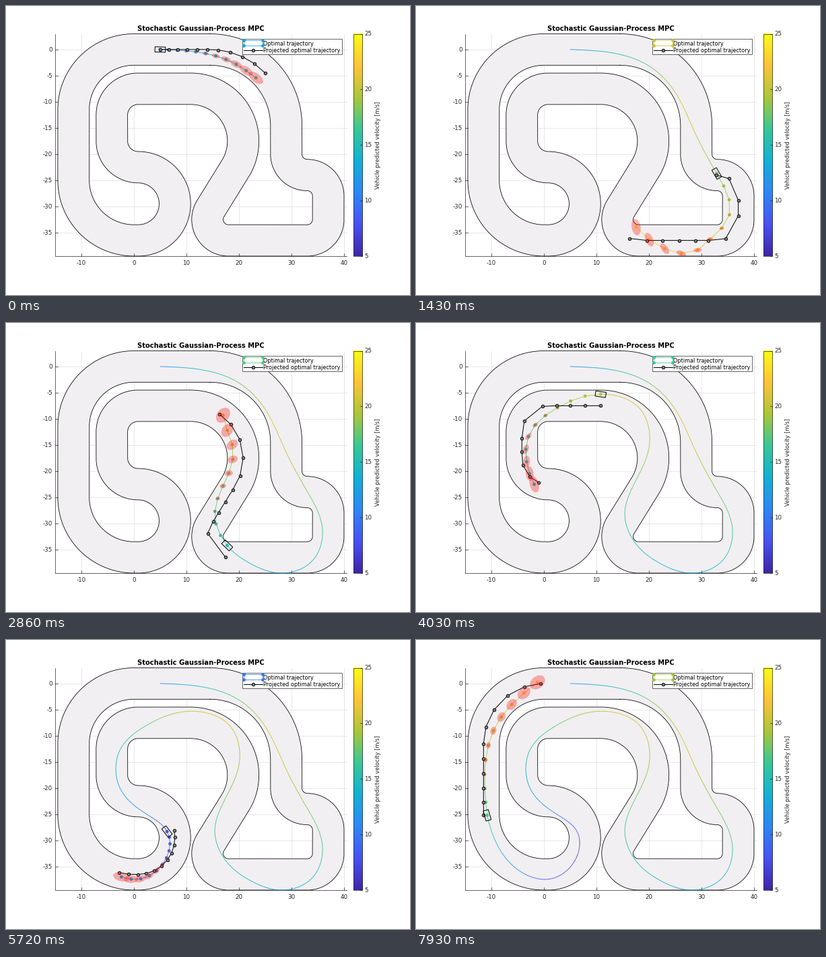
A matplotlib script for the animation above (8 s loop, 600 px wide and 431 px high).

```python
import numpy as np
import matplotlib.pyplot as plt
from matplotlib.animation import FuncAnimation
from matplotlib.collections import LineCollection
from matplotlib.colors import LinearSegmentedColormap, Normalize
from matplotlib.patches import Ellipse, Polygon, Rectangle

W, H, DPI = 600, 431, 72
LOOP, TICK, STEP = 8000, 50, 130      # ms
LAST = 61                             # last simulation step
SUB = 10                              # trail samples per step
SCALE, X0, Y0 = 7.8, 190, 64.9        # pixels per metre, pixel of (0, 0)
INK = "0.15"
plt.rcParams["font.family"] = "DejaVu Sans"

parula = LinearSegmentedColormap.from_list("parula", [
    (.2422, .1504, .6603), (.2810, .3228, .9579), (.1786, .5289, .9682),
    (.0689, .6948, .8394), (.2161, .7843, .5923), (.6720, .7793, .2227),
    (.9970, .7659, .2199), (.9769, .9839, .0805)])
speed_norm = Normalize(5, 25)


def speed_color(v):
    return parula(speed_norm(v))


def to_px(p):
    return np.asarray(p) * (SCALE, -SCALE) + (X0, Y0)


def bump(x, mid, width):
    return np.exp(-((x - mid) / width) ** 2)


def arc_length(p):
    return np.r_[0, np.cumsum(np.hypot(*np.diff(p, axis=0).T))]


def along(p, s, at):
    return np.c_[np.interp(at, s, p[:, 0]), np.interp(at, s, p[:, 1])]


def spline(points, n=2000):
    """Natural cubic through points: the curve and the knots' arc lengths."""
    p = np.asarray(points, float)
    t = arc_length(p)
    h = np.diff(t)
    slope = np.diff(p, axis=0) / h[:, None]
    a, rhs = np.eye(len(p)), np.zeros_like(p)
    for i in range(1, len(p) - 1):
        a[i, i - 1:i + 2] = h[i - 1], 2 * (h[i - 1] + h[i]), h[i]
        rhs[i] = 6 * (slope[i] - slope[i - 1])
    m = np.linalg.solve(a, rhs)
    u = np.linspace(0, t[-1], n)
    i = np.clip(np.searchsorted(t, u) - 1, 0, len(h) - 1)
    w = ((u - t[i]) / h[i])[:, None]
    q = 1 - w
    curve = (q * p[i] + w * p[i + 1]
             + ((q**3 - q) * m[i] + (w**3 - w) * m[i + 1]) * h[i, None]**2 / 6)
    return curve, np.interp(t, u, arc_length(curve))


# ---- track: arcs (cx, cy, radius, from, to) joined by straights ----
ARCS = [
    (14.5, -14.5, 14.5, 90, 0), (33, -20, 4, 180, 270), (33, -28, 4, 90, 0),
    (33, -32.5, 4, 0, -90), (18, -32.5, 4, -90, -211.7),
    (10.8, -17.5, 10, -31.7, 90), (.8, -12.5, 5, 90, 180),
    (.8, -17.5, 5, 180, 270), (.8, -29.5, 7, 90, -90),
    (0, -25, 11.5, 270, 180), (0, -11.5, 11.5, 180, 90)]


def track_line(offset):
    """Closed line parallel to the track centre, positive to the left."""
    parts = []
    for cx, cy, r, a, b in ARCS:
        t = np.radians(np.linspace(a, b, 60))
        rad = r + offset * (1 if b < a else -1)
        parts.append(np.c_[cx + rad * np.cos(t), cy + rad * np.sin(t)])
    parts.append(parts[0][:1])
    return np.vstack(parts)


# ---- driven route through a few points (metres) ----
ROUTE = [
    (5, 0), (14.1, -.85), (20.1, -3.2), (25, -8.2), (28.8, -16),
    (32.9, -23.7), (35.9, -31.2), (34, -37.1), (28.2, -39.5), (22.4, -37.8),
    (17.75, -34.2), (15.4, -28.2), (17.3, -22.2), (20.1, -14.8), (18.2, -8),
    (10.8, -5.3), (2.4, -8), (-2.8, -13), (-2.6, -20.1), (2.6, -25.1),
    (6.3, -28.3), (6.7, -31.7), (1.5, -37.3), (-5.1, -35.5), (-10.8, -25.2),
    (-11.5, -18), (-9.5, -8.6), (1, 1.9)]
PASS_STEPS = [0, 11, 22, 31, 44, 53, 61]      # when these points are passed
PASS_POINTS = [0, 5, 10, 15, 20, 22, 24]
SPEED_STEPS = [0, 7.5, 12, 18, 30, 36, 45, 54, 61]
SPEEDS = [10.5, 21, 17.5, 12.3, 21, 14.5, 7, 7.5, 17]

route, knot_s = spline(ROUTE)
route_s = arc_length(route)
fine = np.arange(LAST * SUB + 1) / SUB
speed = np.interp(fine, SPEED_STEPS, SPEEDS)
ran = np.cumsum(speed) - speed[0]
trail_s = np.interp(ran, ran[np.array(PASS_STEPS) * SUB], knot_s[PASS_POINTS])
trail = along(route, route_s, trail_s)
trail_px = to_px(trail)
trail_segs = np.stack([trail_px[:-1], trail_px[1:]], axis=1)
trail_cols = speed_color(speed[:-1])

# ---- planned line: the route, swerving aside (place, metres left, width) ----
SWERVES = [(24, 1.2, 4), (55, -2.3, 5.5), (98, 2.3, 6), (139, -1.5, 4.5),
           (173, .9, 5)]
HORIZON, PLAN_DT = 10, .15
tangent = np.gradient(route, route_s, axis=0)
aside = sum(a * bump(route_s, s, w) for s, a, w in SWERVES)
plan = route + np.c_[-tangent[:, 1], tangent[:, 0]] * aside[:, None]
plan_s = arc_length(plan)

centre = track_line(0)
centre_s = arc_length(centre)
dense_s = np.linspace(0, centre_s[-1], 3000)
dense = along(centre, centre_s, dense_s)


def predict(k):
    """Predicted points and speeds: speeding up, but braking near step 32."""
    n = k * SUB
    gain = 5.5 - 11.5 * bump(k, 32, 5)
    v = speed[n] + np.linspace(0, gain, HORIZON + 1)
    start = np.interp(trail_s[n], route_s, plan_s)
    gone = np.r_[0, np.cumsum(v[:-1])] * PLAN_DT
    pts = along(plan, plan_s, start + gone)
    fade = .7 ** np.arange(HORIZON + 1)[:, None]
    return pts + (trail[n] - pts[0]) * fade, v


def project(points):
    """Nearest centre-line points, leading a little far ahead."""
    gap = np.hypot(points[:, None, 0] - dense[:, 0],
                   points[:, None, 1] - dense[:, 1])
    s = dense_s[gap.argmin(axis=1)] + .06 * np.arange(len(points))
    return along(centre, centre_s, s % centre_s[-1])


# ---- fixed parts ----
fig = plt.figure(figsize=(W / DPI, H / DPI), dpi=DPI, facecolor="white")
ax = fig.add_axes([0, 0, 1, 1])
ax.axis("off")
LEFT, RIGHT, TOP, BOTTOM = 72.5, 506, 41.5, 372.8
BAR_L, BAR_R = 515.5, 529


def line(x, y, color=INK, lw=.7, **kw):
    return ax.plot(x, y, color=color, lw=lw, **kw)[0]


def label(x, y, s, size=8.8, color=INK, **kw):
    kw = {"ha": "center", "va": "center", **kw}
    ax.text(x, y, s, fontsize=size, color=color, **kw)


for m in range(-10, 41, 10):
    x = X0 + m * SCALE
    line([x, x], [TOP, BOTTOM], "0.87", zorder=1)
    line([x, x], [BOTTOM, BOTTOM - 4], zorder=4)
    label(x, 383.3, str(m))
for m in range(-35, 1, 5):
    y = Y0 - m * SCALE
    line([LEFT, RIGHT], [y, y], "0.87", zorder=1)
    line([LEFT, LEFT + 4], [y, y], zorder=4)
    label(69, y + .5, str(m), ha="right")
line([LEFT, LEFT, RIGHT], [TOP, BOTTOM, BOTTOM], zorder=4)
label(289.5, 37, "Stochastic Gaussian-Process MPC", 10, "black",
      weight="bold", va="baseline")

left, right = to_px(track_line(3)), to_px(track_line(-3))
ax.add_patch(Polygon(np.vstack([left, right[::-1]]), fc="#f1eff1", ec="none",
                     zorder=2))
for border in (left, right):
    line(*border.T, "black", .8, zorder=3)

ax.imshow(np.linspace(1, 0, 256)[:, None], cmap=parula, aspect="auto",
          extent=(BAR_L, BAR_R, BOTTOM, TOP), zorder=2)
ax.add_patch(Rectangle((BAR_L, TOP), BAR_R - BAR_L, BOTTOM - TOP, fill=False,
                       ec=INK, lw=.7, zorder=3))
for v in range(5, 26, 5):
    y = BOTTOM - (v - 5) / 20 * (BOTTOM - TOP)
    line([BAR_R - 3, BAR_R], [y, y], zorder=4)
    label(532, y + .5, str(v), ha="left")
label(552.2, 207.5, "Vehicle predicted velocity [m/s]", 8.25, rotation=90)

# ---- legend ----
DOT = dict(marker="o", mfc="0.5", mec="black", ms=4.5, mew=.9)
ax.add_patch(Rectangle((350.5, 49), 148, 23, fc="white", ec=INK, lw=.7,
                       zorder=20))
key_box = line([353, 380.5, 380.5, 353, 353], [51.4, 51.4, 59.2, 59.2, 51.4],
               lw=.8, marker="o", ms=4.8, mew=0, zorder=21)
line([353, 366.5, 380.5], [66.3] * 3, "black", 1, markevery=[1], zorder=21,
     **DOT)
for y, s in ((59, "Optimal trajectory"),
             (69.1, "Projected optimal trajectory")):
    label(382.3, y, s, 8.15, "black", ha="left", va="baseline", zorder=21)

# ---- moving parts ----
history = ax.add_collection(LineCollection([], linewidths=.9, zorder=5))
plan_line = ax.add_collection(LineCollection([], linewidths=.8, zorder=6))
plan_dots = ax.scatter(np.zeros(HORIZON + 1), np.zeros(HORIZON + 1), s=24,
                       linewidths=0, zorder=7)
reference = line([], [], "black", 1, zorder=8, **DOT)
body = ax.add_patch(Polygon(np.zeros((4, 2)), fill=False, ec="black", lw=1,
                            zorder=9))
spots = [ax.add_patch(Ellipse((0, 0), 1, 1, fc=(1, 0, 0, .3), ec="none",
                              zorder=10)) for _ in range(HORIZON)]
ax.set_xlim(0, W)
ax.set_ylim(H, 0)


def draw(i):
    k = min(((i + 1) * TICK - 1) // STEP, LAST)
    n = k * SUB
    history.set_segments(trail_segs[:n])
    history.set_color(trail_cols[:n])

    points, v = predict(k)
    pts = to_px(points)
    cols = speed_color(v)
    plan_line.set_segments(np.stack([pts[:-1], pts[1:]], axis=1))
    plan_line.set_color(cols[:-1])
    plan_dots.set_offsets(pts)
    plan_dots.set_facecolor(cols)
    reference.set_data(*to_px(project(points)).T)
    key_box.set_color(speed_color(v.mean() - .7))

    # the nose lags a little behind the turn
    d = trail_px[min(n + 1, LAST * SUB)] - trail_px[max(n - SUB, 0)]
    d *= SCALE / np.hypot(*d)
    side = np.array([-d[1], d[0]]) / 2
    car = trail_px[n]
    body.set_xy([car + d + side, car + d - side, car - d - side,
                 car - d + side])

    size = 12.5 - 6 * bump(k, 52, 4)
    ratio = .52 + .2 * bump(k, 22, 6) + .2 * bump(k, 61, 6)
    tilt = 66 * bump(k, 18, 9)
    for j, spot in enumerate(spots, 1):
        dx, dy = pts[j] - pts[j - 1]
        grow = 2 * size * (j / HORIZON) ** 1.4
        spot.set_center(pts[j])
        spot.set_width(grow)
        spot.set_height(grow * ratio)
        spot.set_angle(np.degrees(np.arctan2(dy, dx)) + tilt)

    return [history, plan_line, plan_dots, reference, body, key_box, *spots]


anim = FuncAnimation(fig, draw, frames=LOOP // TICK, interval=TICK,
                     init_func=lambda: draw(0), repeat=True, repeat_delay=0,
                     blit=False)
plt.show()
```
